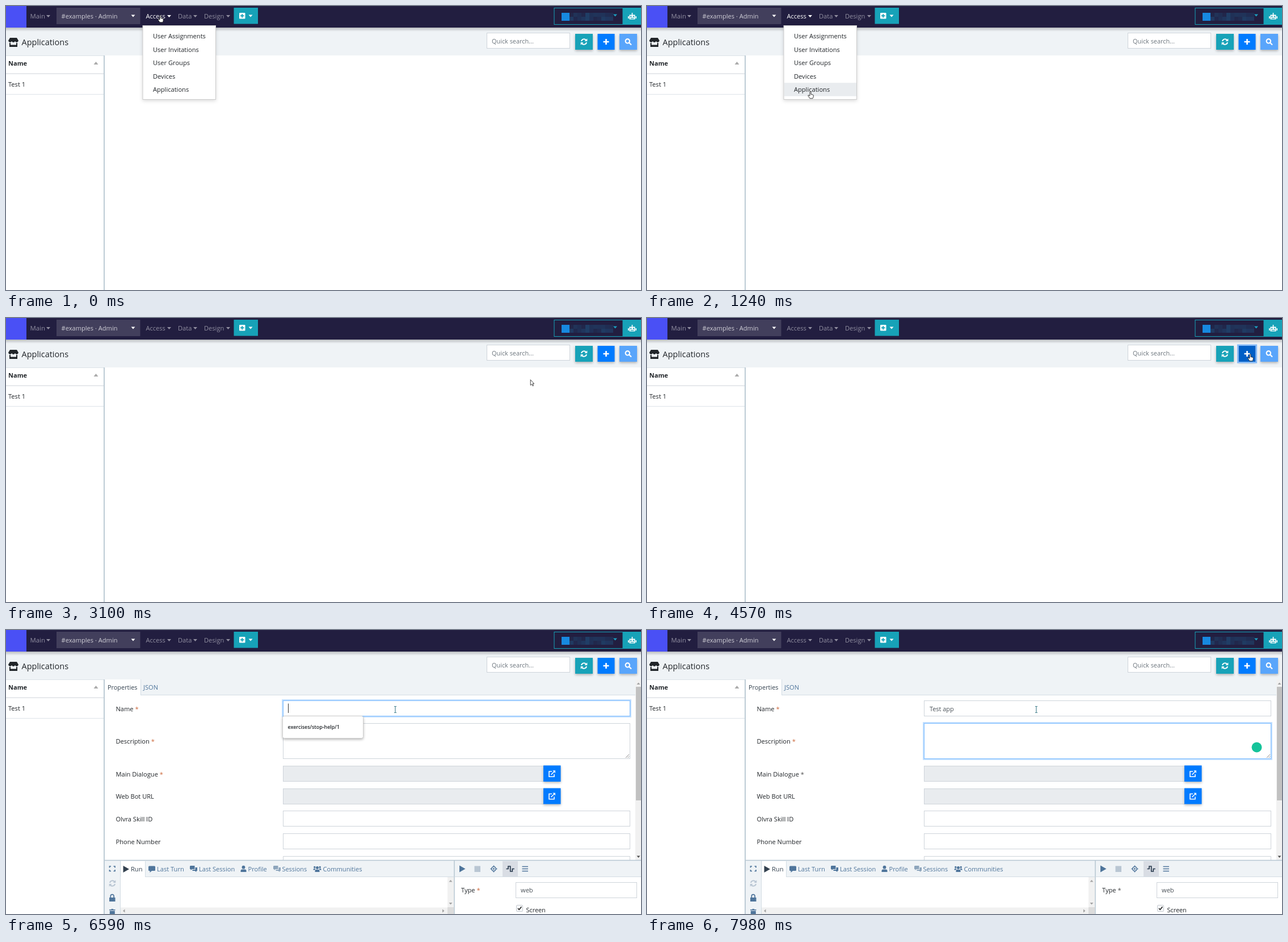
Recreate the animation shown at these times as an HTML page. Size 1119 px wide and 500 px high, loop 8000 ms.

```html
<!DOCTYPE html>
<html lang="en">
<head>
<meta charset="utf-8">
<title>Applications</title>
<style>
  html, body { margin: 0; width: 100%; height: 100%; overflow: hidden; background: #fff; }
  svg { display: block; width: 100vw; height: 100vh; }
  text { font: 11.1px "Open Sans", "Noto Sans", sans-serif; fill: #212529; white-space: pre; }
  .nav text { fill: #918fa0; }
  .nav .light { fill: #cfced6; }
  .muted { fill: #6c757d; }
  .tabs text { fill: #4f759b; }
  .tabs .current { fill: #33414f; }
  .blue { color: #4f759b; }
  .pale { color: #b9c6d3; }
  .white { color: #fff; }
  .field { fill: #fff; stroke: #ced4da; }
  .readonly { fill: #e9ecef; stroke: #ced4da; }
  .raised { filter: drop-shadow(0 2px 2px rgba(0, 0, 0, .28)); }
  .ring { fill: none; }
  .star { fill: #cd6a3e; }
  .solid { fill: currentColor; }
  .stroke { fill: none; stroke: currentColor; }
</style>
</head>
<body>
<svg viewBox="0 0 1119 500">
  <defs>
    <linearGradient id="fade" x2="0" y2="1">
      <stop stop-color="#000" stop-opacity=".22"/><stop offset="1" stop-color="#000" stop-opacity="0"/>
    </linearGradient>
    <path id="caretDown" class="solid" d="M0 0H7L3.5 4z"/>
    <g id="refresh">
      <path class="stroke" stroke-width="2" d="M-4.5-1A4.7 4.7 0 0 1 4-2.6M4.5 1A4.7 4.7 0 0 1-4 2.6"/>
      <path class="solid" d="M5.8-5.8V-1H1zM-5.8 5.8V1H-1z"/>
    </g>
    <path id="plus" class="stroke" stroke-width="2.6" d="M-5 0H5M0-5V5"/>
    <g id="lens" class="stroke" stroke-width="2.1"><circle cx="-1.2" cy="-1.2" r="3.7"/><path d="M1.5 1.5L5.5 5.5"/></g>
    <g id="openLink">
      <path class="stroke" stroke-width="1.6" d="M0-4H-5V5.2H4V1M-1.5 1.8L4-3.7"/>
      <path class="solid" d="M1.3-5.8H6V-1z"/>
    </g>
    <path id="play" class="solid" d="M0-6L10.5 0 0 6z"/>
    <path id="bubble" class="solid" d="M1.5-6h9q1.5 0 1.5 1.5v5.500q0 1.500-1.500 1.500H6L2.500 5.500V2.500H1.500Q0 2.500 0 1V-4.500Q0-6 1.500-6z"/>
    <g id="bubbles" class="solid">
      <path d="M1-5.500h7.500v6H4L1.500 2.500V.5H0V-4.500z"/><path d="M9.500-2.500h3.500v6h-1.500V5.500L8.500 3.500H4.500V1.500h5z"/>
    </g>
    <g id="person" class="solid"><circle cx="5" cy="-2.800" r="2.900"/><path d="M0 5.500V3.500Q0 1 2.500 1h5Q10 1 10 3.500V5.500z"/></g>
    <g id="people" class="solid">
      <circle cx="2.300" cy="-3" r="1.700"/><circle cx="11.700" cy="-3" r="1.700"/><circle cx="7" cy="-2" r="2.500"/>
      <path d="M0 2V1Q0-.7 2-.7H4Q3 .3 3 2zM14 2V1Q14-.7 12-.7H10Q11 .3 11 2zM3 5.500V3.500Q3 1.200 5.300 1.200h3.400Q11 1.200 11 3.500v2z"/>
    </g>
    <path id="hand" fill="#fff" stroke="#222" stroke-width=".9" d="M-1 1.200q1-2 2 0v4.300l3.200.7q1.300.4 1.200 1.800l-.6 3.200-.8 1.600h-5l-3-4.600q-.6-1.400 1-1.200l2 1.200z"/>
    <path id="arrow" fill="#fff" stroke="#333" stroke-width=".9" d="M.5.500V10.300l2.300-2.100 1.600 3.400 1.500-.7-1.600-3.300H7z"/>
    <path id="beam" fill="none" stroke="#2b6f7f" d="M-2-5.500h1.500L0-5 .5-5.500H2M0-5V5M-2 5.500h1.500L0 5 .5 5.500H2"/>
  </defs>

  <rect width="1119" height="500" fill="#fff"/>

  <!-- page heading -->
  <rect y="38" width="1119" height="49" fill="#eff3f6"/>
  <rect y="38" width="1119" height="7" fill="url(#fade)"/>
  <path fill="#212529" d="M7 56h12l3 5q-1 3-3 3t-3-2q-1 2-3 2t-3-2q-1 2-3 2t-3-3zM6 65v7h14v-7h-2v3.500h-10v-3.500z"/>
  <text x="27.500" y="69" style="font-size:14.500px;font-weight:500">Applications</text>
  <rect class="field" x="847.500" y="47.500" width="146" height="27"/>
  <text class="muted" x="856" y="66" style="font-size:10.900px">Quick search...</text>
  <g class="raised">
    <rect x="1003" y="49" width="31" height="28" fill="#17a2b8"/>
    <rect id="addButton" x="1042.500" y="49" width="30" height="28"/>
    <rect x="1081" y="49" width="31" height="28" fill="#59a5fb"/>
  </g>
  <rect id="addRing" class="ring" x="1041.200" y="47.700" width="32.600" height="30.600" stroke="#86bbf8" stroke-width="2.600"/>
  <g class="white">
    <use href="#refresh" x="1018.500" y="63"/><use href="#plus" x="1057.500" y="63"/><use href="#lens" x="1096.500" y="63"/>
  </g>

  <!-- list -->
  <path stroke="#dde3e8" d="M0 87.500H172M0 155.500H172"/>
  <path stroke="#dee2e6" stroke-width="1.500" d="M0 119.200H172"/>
  <text x="4" y="105" font-weight="700" style="font-weight:700">Name</text>
  <path fill="#aaa" d="M154.500 103h8l-4-5z"/>
  <text x="4" y="142">Test 1</text>
  <path stroke="#b6c6d1" stroke-width="1.800" d="M173 87V500"/>

  <!-- editor -->
  <g id="editor">
    <path fill="#eff3f6" d="M174 87H1109V114H174z"/>
    <path stroke="#d3dde4" d="M174 114.500H1109M237.500 87V114"/>
    <rect x="174" y="87" width="63" height="28" fill="#fff"/>
    <g class="tabs">
      <text class="current" x="179" y="105" style="font-size:10.900px">Properties</text><text x="242" y="105">JSON</text>
    </g>
    <text x="193.500" y="143">Name <tspan class="star">*</tspan></text>
    <text x="193.500" y="200">Description <tspan class="star">*</tspan></text>
    <text x="193.500" y="258">Main Dialogue <tspan class="star settling">*</tspan></text>
    <text x="193.500" y="297">Web Bot URL</text>
    <text x="193.500" y="337">Olvra Skill ID</text>
    <text x="193.500" y="377">Phone Number</text>
    <rect class="field" x="488.500" y="124.500" width="611" height="27"/>
    <rect class="field" x="488.500" y="164.500" width="611" height="62"/>
    <rect class="readonly" x="488.500" y="239.500" width="459" height="27"/>
    <rect class="readonly" x="488.500" y="279.500" width="459" height="27"/>
    <rect class="field" x="488.500" y="318.500" width="611" height="27"/>
    <rect class="field" x="488.500" y="358.500" width="611" height="27"/>
    <path class="field" d="M488.500 405V398.500H1099.500V405"/>
    <path stroke="#888" d="M1092 225l6-6M1095.500 225l2.500-2.500"/>
    <g class="raised" fill="#007bff">
      <rect x="947" y="238.500" width="30.500" height="28.500"/><rect x="947" y="278.500" width="30.500" height="28"/>
    </g>
    <g class="white"><use href="#openLink" x="962" y="253"/><use href="#openLink" x="962" y="292.500"/></g>
    <g id="nameRing" class="ring">
      <rect x="487.300" y="123.300" width="613.400" height="29.400" stroke="#bfdeff" stroke-width="2.400"/>
      <rect x="488.500" y="124.500" width="611" height="27" stroke="#80bdff"/>
    </g>
    <g id="noteRing" class="ring">
      <rect x="487.300" y="163.300" width="613.400" height="64.400" stroke="#bfdeff" stroke-width="2.400"/>
      <rect x="488.500" y="164.500" width="611" height="62" stroke="#80bdff"/>
    </g>
    <circle id="helper" cx="1074.500" cy="206.500" r="9" fill="#15c39a"/>
    <text id="typed" class="typed" x="498" y="143" style="fill:#495057;font-size:10.900px"></text>
    <path id="caret" stroke="#333" d="M0 129.500V146"/>
    <g id="suggestion">
      <rect x="487.500" y="151.500" width="142" height="39" rx="3" fill="#fff" stroke="#cfcfcf" class="raised"/>
      <text x="496.500" y="174" style="font-size:8.900px;font-weight:600">exercises/stop-help/1</text>
    </g>
    <rect x="1109" y="87" width="10" height="318" fill="#f1f1f1"/>
    <rect x="1110" y="100" width="9" height="200" fill="#c1c1c1"/>
    <path fill="#a3a3a3" d="M1111.500 96h6l-3-3.500z"/><path fill="#505050" d="M1111.500 397.500h6l-3 3.500z"/>

    <!-- lower panels -->
    <path fill="#eff3f6" d="M174 406H1119V434H201V500H174z"/>
    <rect x="203" y="407" width="42" height="28" fill="#fff"/>
    <rect x="875" y="407" width="27" height="27" fill="#d9dde4"/>
    <path stroke="#d3dde4" d="M201.500 406V500M245.500 407V434M245 434.500H789M791 434.500H1119"/>
    <path stroke="#b6c6d1" stroke-width="1.500" d="M174 405.500H1119M790 406V500"/>
    <g class="blue">
      <path class="stroke" stroke-width="1.700" d="M182.500 418.500V416H185M189.500 416H192V418.500M192 422V424.500H189.500M185 424.500H182.500V422"/>
      <path class="solid" d="M182 471h10.500v7H182z"/><path class="stroke" stroke-width="1.700" d="M184.300 471V468.500a2.900 2.900 0 0 1 5.800 0V471"/>
      <path class="solid" d="M182 492h3l1-1h2.500l1 1h3v1.500H182zM182.800 494.500h9V500h-9z"/>
      <use href="#bubble" x="251" y="421.500"/><use href="#bubbles" x="324" y="420.500"/>
      <use href="#person" x="413.500" y="420.500"/><use href="#people" x="541.500" y="420.500"/>
      <use href="#play" x="799" y="420.500"/>
      <g class="stroke" stroke-width="1.600"><circle cx="859.500" cy="420.500" r="3.700"/><path d="M859.500 414.500v2.500M859.500 424v2.500M853.500 420.500h2.500M863 420.500h2.500"/></g>
      <circle class="solid" cx="859.500" cy="420.500" r="1.500"/>
      <path class="stroke" stroke-width="1.700" d="M909.500 416.500h10.500M909.500 420.500h10.500M909.500 424.500h10.500"/>
    </g>
    <path fill="none" stroke="#26384c" stroke-width="1.700" d="M881.500 420.500h3.500V416h3.700v9h3.600v-4.500h3.500"/>
    <g class="pale">
      <use href="#refresh" x="187.500" y="446"/><rect class="solid" x="825.500" y="415.500" width="10.500" height="10.500"/>
    </g>
    <g style="color:#8da5bc"><use href="#bubbles" x="471" y="420.500"/></g>
    <g style="color:#33414f"><use href="#play" x="206.500" y="421"/></g>
    <g class="tabs">
      <text class="current" x="220" y="425">Run</text><text x="266" y="425">Last Turn</text>
      <text x="340" y="425">Last Session</text><text x="426.500" y="425">Profile</text>
      <text x="486.500" y="425" style="font-size:10.900px">Sessions</text><text x="558.500" y="425">Communities</text>
    </g>
    <path fill="#f1f1f1" d="M778 435h11v53h-11zM202 488.500h576V500H202z"/>
    <rect x="778" y="488" width="11" height="12" fill="#dcdcdc"/>
    <path fill="#a3a3a3" d="M780.500 443.500h6l-3-3.500zM780.500 480h6l-3 3.500zM209.500 491.500v6l-3.500-3zM769 491.500v6l3.500-3z"/>
    <text x="802" y="462">Type <tspan class="star settling">*</tspan></text>
    <rect class="field" x="898.500" y="444.500" width="213" height="27"/>
    <text x="907" y="462" style="fill:#495057">web</text>
    <rect x="899.500" y="484.500" width="11" height="11" rx="1.500" fill="#f7f8f9" stroke="#c5cad0"/>
    <path fill="none" stroke="#222" stroke-width="1.600" d="M902 490l2.200 2.300 4.200-5"/>
    <text x="916.500" y="496.500" style="font-size:10.900px">Screen</text>
  </g>

  <!-- navigation bar -->
  <g class="nav">
    <rect width="1119" height="38" fill="#221e40"/>
    <rect width="36" height="38" fill="#4a50f5"/>
    <rect x="89" y="3" width="147.500" height="29" fill="#423f5c"/>
    <text x="42.500" y="22" style="font-size:11.400px">Main</text>
    <text class="light" x="97.500" y="22">#examples · Admin</text>
    <text id="access" x="246.500" y="22">Access</text>
    <text x="303" y="22">Data</text>
    <text x="349" y="22">Design</text>
    <g style="color:#918fa0"><use href="#caretDown" x="71" y="16"/><use href="#caretDown" x="330" y="16"/><use href="#caretDown" x="388" y="16"/></g>
    <use id="accessCaret" href="#caretDown" x="284" y="16"/>
    <rect x="401.500" y="3" width="42.500" height="28.500" fill="#17a2b8"/>
    <g class="white">
      <use href="#caretDown" x="220.500" y="15.500"/><use href="#caretDown" x="427.500" y="15.500"/>
      <rect class="solid" x="411" y="12" width="10.500" height="10.500" rx="1.300"/>
    </g>
    <path stroke="#17a2b8" stroke-width="1.800" d="M413 17.250h6.500M416.250 14v6.500"/>
    <rect x="966" y="3.500" width="121" height="29" fill="none" stroke="#17a2b8"/>
    <g id="mosaic"><rect x="979" y="12" width="14" height="14" fill="#1789e0"/></g>
    <use href="#caretDown" x="1070" y="14.500" style="color:#1c9fc0"/>
    <rect x="1087" y="3" width="32" height="30" fill="#17a2b8"/>
    <g transform="translate(1103.500 18)">
      <path fill="#fff" d="M-5-2.500H-.8V-6H.8V-2.500H5V5.500H-5zM-7.500 0h1.700v4h-1.700zM5.800 0h1.700v4h-1.700z"/>
      <g fill="#17a2b8"><circle cx="-2.300" cy=".5" r="1.200"/><circle cx="2.300" cy=".5" r="1.200"/><path d="M-3 3h6v1.200h-6z"/></g>
    </g>
  </g>

  <!-- access menu -->
  <g id="menu">
    <rect x="241" y="34.500" width="128.500" height="130" fill="#fff" stroke="#ccc" style="filter:drop-shadow(0 2px 3px rgba(0,0,0,.15))"/>
    <rect id="highlight" x="242" width="127" height="23.500"/>
    <text x="259" y="57">User Assignments</text>
    <text x="259" y="80.500">User Invitations</text>
    <text x="259" y="104">User Groups</text>
    <text x="259" y="127.500">Devices</text>
    <text id="appsItem" x="259" y="151">Applications</text>
  </g>

  <use id="pointer"/>
</svg>
<script>
const LOOP = 8000, MENU_TOP = 41.25, ROW = 23.5;
const PRESS = 1550, MENU_CLOSED = 1700, ADD = 4410, EDITOR = 4720, LEAVE_ADD = 5650,
      NAME_FOCUS = 5970, SUGGEST = 6130, TYPING = 6730, NOTE_FOCUS = 7660;
const keyTimes = [6730, 6870, 6980, 7090, 7230, 7290, 7350, 7410];

// start, end, steps, x, y, ease-out power, sideways bend
const moves = [
  [150, 930, 11, 288, 140, 1, 0],
  [1010, 1240, 4, 288, 150, 1, 0],
  [2560, 2800, 4, 844, 124, 1.3, 17],
  [3100, 3710, 9, 1065, 65, 3.8, 6],
  [3860, 4090, 4, 1063, 63, 1, 0],
  [5650, 5930, 7, 686, 140, 2.7, 17]
];

const $ = id => document.getElementById(id);
const set = (id, attrs) => { for (const key in attrs) $(id).setAttribute(key, attrs[key]); };
const show = (id, on) => { $(id).style.display = on ? "" : "none"; };
const fade = (t, start) => Math.min(1, Math.max(0, (t - start) / 150));

function pointerAt(t) {
  let x = 272, y = 16;
  for (const [start, end, steps, toX, toY, power, bend] of moves) {
    if (t < start) break;
    const step = Math.min(steps, 1 + Math.floor((t - start) / (end - start) * (steps - 1) + 1e-6));
    const p = 1 - (1 - step / steps) ** power;
    x += (toX - x) * p;
    y += (toY - y) * p + bend * Math.sin(Math.PI * p);
  }
  return { x, y };
}

function drawMosaic() {
  let seed = 11, blocks = "";
  for (let i = 0; i < 22; i++) {
    seed = seed * 16807 % 2147483647;
    const opacity = 0.08 + 0.3 * seed / 2147483647;
    blocks += `<rect x="${993 + i % 11 * 7}" y="${12 + (i > 10) * 7}" width="7" height="7" fill="#1c7db0" opacity="${opacity}"/>`;
  }
  $("mosaic").insertAdjacentHTML("beforeend", blocks);
}

function render(t) {
  const { x, y } = pointerAt(t);
  const menuOpen = t < MENU_CLOSED;
  const overAdd = x >= 1042 && x <= 1073 && y >= 49 && y <= 77;

  const row = Math.floor((y - MENU_TOP) / ROW), pressed = t >= PRESS;
  show("menu", menuOpen);
  show("highlight", row >= 0);
  set("highlight", { y: MENU_TOP + row * ROW, fill: pressed ? "#007bff" : "#e9ecef" });
  $("appsItem").style.fill = pressed ? "#fff" : "";
  $("access").style.fill = menuOpen ? "#fff" : "";
  $("accessCaret").style.color = menuOpen ? "#fff" : "#918fa0";

  const addFocused = t >= ADD && t < NAME_FOCUS;
  set("addButton", { fill: addFocused && t < EDITOR ? "#005fc6" : addFocused || overAdd ? "#0069d9" : "#007bff" });
  set("addRing", { opacity: fade(t, ADD) - fade(t, NAME_FOCUS) });

  show("editor", t >= EDITOR);
  set("nameRing", { opacity: fade(t, NAME_FOCUS) - fade(t, NOTE_FOCUS) });
  set("noteRing", { opacity: fade(t, NOTE_FOCUS) });
  show("suggestion", t >= SUGGEST && t < TYPING);
  show("helper", t >= NOTE_FOCUS + 120);
  for (const star of document.querySelectorAll(".settling")) star.style.fill = t >= NOTE_FOCUS ? "#555" : "";

  const typed = $("typed");
  typed.textContent = "Test app".slice(0, keyTimes.filter(k => t >= k).length);
  const caretX = 497.5 + (typed.textContent && t >= EDITOR ? typed.getComputedTextLength() : 0);
  set("caret", { transform: `translate(${Math.floor(caretX) + 0.5} 0)` });
  show("caret", t >= NAME_FOCUS && t < NOTE_FOCUS && !(t >= 6380 && t < 6590));

  const shape = menuOpen || overAdd ? "hand" : t >= LEAVE_ADD && y >= 124 ? "beam" : "arrow";
  set("pointer", { href: "#" + shape, x, y });
}

drawMosaic();
const begin = performance.now();
(function frame() {
  render((performance.now() - begin) % LOOP);
  requestAnimationFrame(frame);
})();
</script>
</body>
</html>
```
